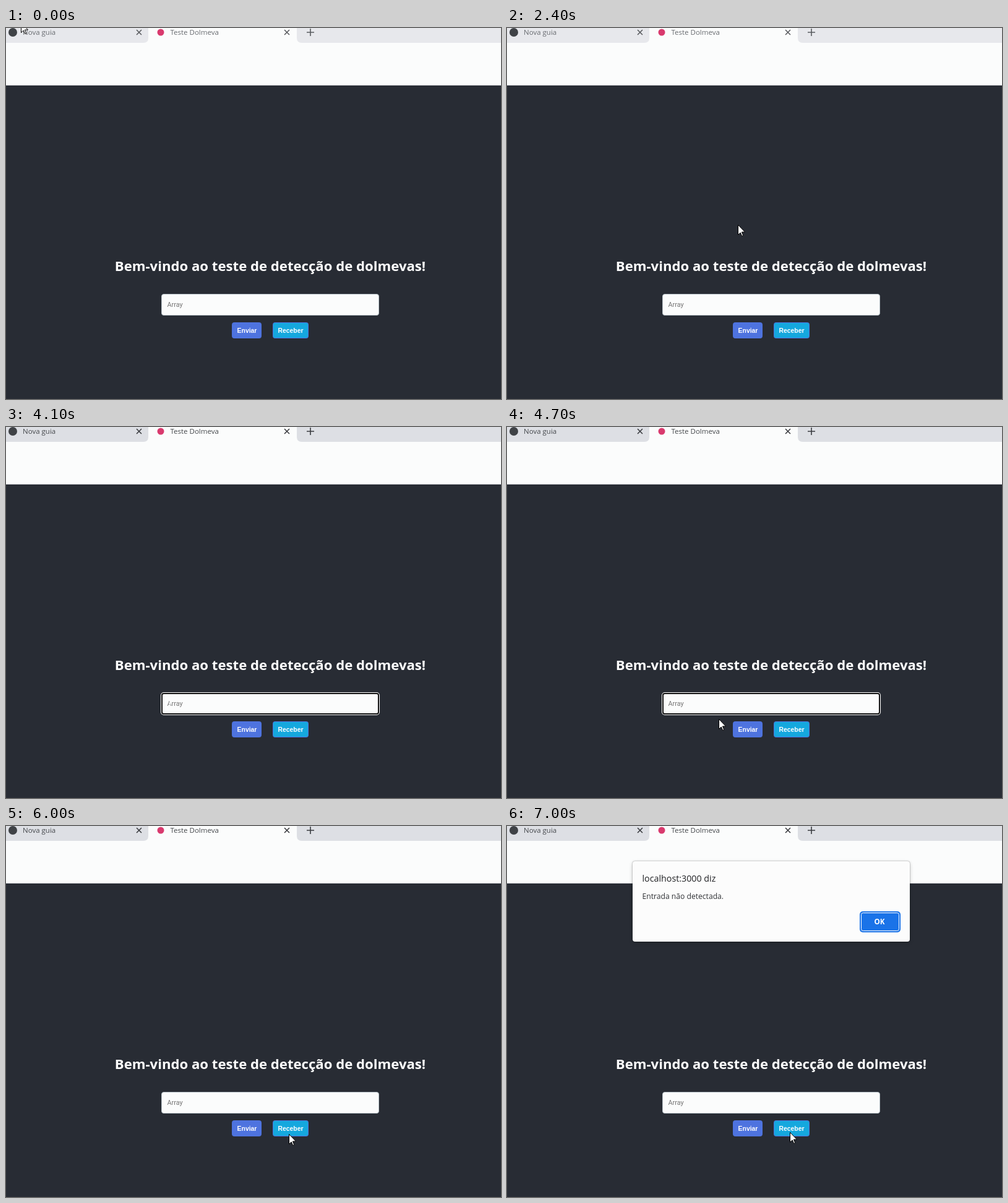
Animation of 800 by 600 pixels, one loop 8 s. Source, as an HTML page:

```html
<!DOCTYPE html>
<html lang="pt-BR">
<head>
<meta charset="utf-8">
<title>Teste Dolmeva</title>
<style>
html, body { margin: 0; width: 100%; height: 100%; overflow: hidden; background: #282c34; }
#stage { position: relative; width: 800px; height: 600px; overflow: hidden; }
svg { position: absolute; left: 0; top: 0; display: block; overflow: visible; }
text { font-family: "Open Sans", "Noto Sans", sans-serif; }
#page { --strip: #e7e8ec; --ink: #686b70; --icon: #5a5c60; }
#page.active { --strip: #dddfe4; --ink: #45484c; --icon: #3a3c40; }
.strip { fill: var(--strip); }
.tab { fill: var(--ink); font-size: 11.5px; }
.icon { stroke: var(--icon); stroke-width: 1.6; fill: none; }
.hint { font: 10.8px Roboto, sans-serif; fill: #757575; }
.btn { font: bold 10.4px "Liberation Sans", Arial, sans-serif; fill: #fff; text-anchor: middle; }
.box { stroke: #4e73df; }
#dialog {
  position: absolute; left: 203px; top: 57px; width: 448px; height: 130px;
  background: #fcfcfc; border-radius: 4px; box-shadow: 0 0 2px rgba(0, 0, 0, .45), 0 2px 6px rgba(0, 0, 0, .2);
}
#dialog.opening { opacity: .57; transform: translateY(-11px) perspective(1500px) scale(1.002) rotateX(6deg); }
</style>
</head>
<body>
<div id="stage">
  <svg id="page" width="800" height="600" viewBox="0 0 800 600">
    <rect width="800" height="600" fill="#282c34"/>
    <rect width="800" height="93" fill="#fbfcfc"/>
    <rect y="92" width="800" height="1" fill="#dadce0"/>
    <path class="strip" d="M0 0H230V16Q230 24 222 24H0Z"/>
    <path class="strip" d="M470 0H800V24H478Q470 24 470 16Z"/>
    <circle cx="11" cy="7" r="7" fill="#3f4246"/>
    <circle cx="250" cy="7" r="5.5" fill="#d93a6e"/>
    <text class="tab" x="27" y="11">Nova guia</text>
    <text class="tab" x="265.5" y="11">Teste Dolmeva</text>
    <path class="icon" d="M211 3L219 11M219 3L211 11M450 3L458 11M458 3L450 11"/>
    <path class="icon" d="M486 7H498M492 1V13" stroke-width="1.8"/>

    <text x="427" y="393" font-size="22.15" font-weight="700" fill="#fff" text-anchor="middle">Bem-vindo ao teste de detecção de dolmevas!</text>

    <rect x="251.5" y="430.5" width="351" height="34" rx="3.5" fill="#fbfcfc" stroke="#b8c2c8"/>
    <g id="ring">
      <rect x="250" y="429" width="354" height="37" rx="5" fill="#fff"/>
      <rect x="251" y="430" width="352" height="35" rx="4" fill="#101010"/>
      <rect x="253" y="432" width="348" height="31" rx="2" fill="#fbfcfc"/>
    </g>
    <text class="hint" x="260.5" y="451">Array</text>

    <rect class="box" x="365.5" y="476.5" width="47" height="25" rx="3" fill="#4e73df"/>
    <text class="btn" x="389.5" y="493">Enviar</text>
    <rect class="box" x="431.5" y="476.5" width="57" height="25" rx="3" fill="#15a8de"/>
    <text class="btn" x="460" y="493">Receber</text>
  </svg>

  <div id="dialog">
    <svg width="448" height="130" viewBox="203 57 448 130">
      <text x="218.5" y="90" font-size="14.25" fill="#202124">localhost:3000 diz</text>
      <text x="218.5" y="118" font-size="12.15" fill="#303236">Entrada não detectada.</text>
      <rect x="570" y="138" width="66" height="34" rx="5" fill="#1a73e8"/>
      <rect x="572.5" y="140.5" width="61" height="29" rx="3" fill="#1a73e8" stroke="#fff"/>
      <text x="602" y="159" font-size="11.6" font-weight="700" fill="#fff" text-anchor="middle">OK</text>
    </svg>
  </div>

  <svg width="800" height="600" viewBox="0 0 800 600">
    <path id="arrow" d="M.5.5V16.5L4.2 13 6.7 18.5 8.7 17.6 6.4 12H11.5Z" fill="#fff" stroke="#000"/>
    <path id="beam" d="M0-8V8" stroke="#fbfcfc" stroke-width="1.5"/>
  </svg>
</div>
<script>
const LOOP = 8000, STEP = 100;
const home = { x: 24, y: -9 };
const $ = id => document.getElementById(id);

// pointer moves: first step, last step, place reached
const moves = [
  [1000, 1300, 161, 210],
  [1700, 1700, 164, 210],
  [1900, 2200, 349, 318],
  [2400, 2400, 373, 318],
  [2500, 2600, 443, 363],
  [3000, 3200, 330, 447],
  [4100, 4100, 264.5, 447],
  [4200, 4400, 220, 458],
  [4500, 4800, 364, 474],
  [5000, 5300, 353, 484],
  [5400, 5700, 457, 498],
  [7000, 7000, 457, 495]
];

const smooth = p => p * p * (3 - 2 * p);
const within = (t, from, to) => t >= from && t < to;
const show = (id, on) => { $(id).style.visibility = on ? "visible" : "hidden"; };

function pointer(t) {
  const now = Math.floor(t / STEP) * STEP;
  let { x, y } = home;
  for (const [first, last, toX, toY] of moves) {
    if (now < first) break;
    const p = smooth(Math.min(1, (now - first + STEP) / (last - first + STEP)));
    x += (toX - x) * p;
    y += (toY - y) * p;
  }
  return `translate(${Math.round(x)} ${Math.round(y)})`;
}

function draw(t) {
  const overField = within(t, 3200, 4200);
  const place = pointer(t);
  $("arrow").setAttribute("transform", place);
  $("beam").setAttribute("transform", place);
  show("arrow", !overField);
  show("beam", overField);
  show("ring", within(t, 3500, 6000));
  show("dialog", t >= 6700);
  $("page").classList.toggle("active", t >= 3500);
  $("dialog").classList.toggle("opening", t < 6800);
}

const start = performance.now();
function tick() {
  draw((performance.now() - start) % LOOP);
  requestAnimationFrame(tick);
}
tick();
</script>
</body>
</html>
```
